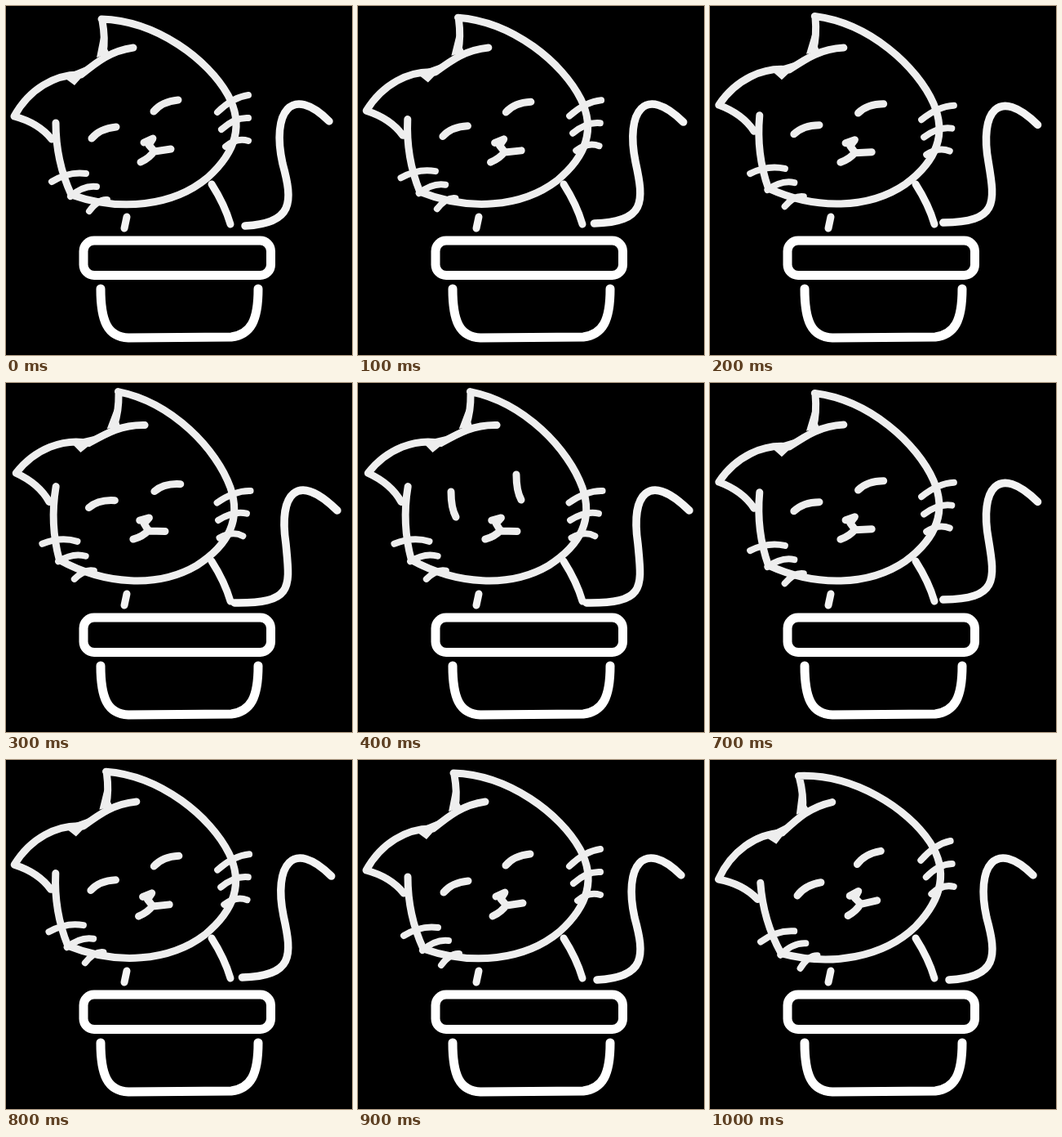
Write an HTML page with a canvas that moves like this. It is 424 px wide and 427 px high and loops after 1200 ms.

```html
<!DOCTYPE html>
<html lang="en">
<head>
<meta charset="utf-8">
<title>Cat in a pot</title>
<style>
html, body { margin: 0; width: 100%; height: 100%; overflow: hidden; background: #000; }
canvas { display: block; }
</style>
</head>
<body>
<canvas width="424" height="427"></canvas>
<script>
const ctx = document.querySelector('canvas').getContext('2d');
const HEAD = '#eee', BODY = '#f4f4f4', POT = '#fff';
const STEP = 100, STEPS = 12;
const TILTS = [9.5, 5.3, 2.6, 0, -4.2]; // degrees, from upright to most tilted

const skull = 'M117 16C185 18 248 66 272 109C290 142 285 176 247 210C205 245 140 252 80 231C68 205 61 175 61 143';
const ears = 'M118 18Q122 40 119 58M156 51C128 55 112 68 92 84C60 83 28 102 10 135Q40 143 56 163';
const earRoots = 'M69 86L84 97L108 70ZM116 38L111 63L127 58Z';
const muzzle = 'M169 167L180 162L175 170L182 178L202 175M165 191Q176 186 182 177';
const neck = 'M252 218Q268 243 275 267M148 258L145 272';
const bowl = 'M116 346C116 385 124 405 150 406L276 405C300 402 309 385 309 346';

// Bezier points of the tail: start, then two cubic segments
const tailLow = [396,141, 350,95, 325,130, 339,193, 352,240, 352,266, 293,269];
const tailHigh = [406,156, 356,107, 334,136, 343,197, 348,250, 353,270, 280,269];

function line(path, width, color) {
  ctx.lineWidth = width;
  ctx.strokeStyle = color;
  ctx.stroke(new Path2D(path));
}

// Quadratic stroke given by offsets from its start
function arc(x, y, bendX, bendY, dx, dy, width) {
  line(`M${x} ${y}q${bendX} ${bendY} ${dx} ${dy}`, width, HEAD);
}

function whisker(x, y, dx, dy) {
  arc(x, y, dx / 2, dy / 2 - 8, dx, dy, 8);
}

function drawTail(lift) {
  const arch = 4 * Math.sin(Math.PI * lift);
  const p = tailLow.map((v, k) => v + (tailHigh[k] - v) * lift - (k % 2) * arch);
  line(`M${p.slice(0, 2)}C${p.slice(2)}`, 9.5, BODY);
}

function drawPot() {
  line(bowl, 11, POT);
  ctx.beginPath();
  ctx.roundRect(95, 287, 229.5, 42.5, 13);
  ctx.stroke();
}

function drawHead(tilt, open) {
  ctx.save();
  ctx.translate(160, 136);
  ctx.rotate(tilt * Math.PI / 180);
  ctx.translate(-160, -136);
  line(skull + ears, 9, HEAD);
  ctx.fillStyle = HEAD;
  ctx.fill(new Path2D(earRoots));
  line(muzzle, 9, HEAD);
  for (let i = 0; i < 3; i++) {
    whisker(297, 109 + 28 * i, 5 * i - 38, 21 - 7 * i);
    whisker(56 + 23 * i, 215 + 18 * i, 42 - 10 * i, -10 - 2 * i);
  }
  if (!open) for (const i of [0, 1]) arc(105 + 76 * i, 162 - 33 * i, 10, -12, 30, -14, 9);
  ctx.restore();
  // open eyes stay upright
  if (open) for (const i of [0, 1]) arc(114 + 80 * i, 133 - 21 * i, 0, 20, 6, 31, 9);
}

function draw() {
  const step = Math.floor(performance.now() / STEP) % STEPS;
  // the swing mirrors around its middle and rests at both ends
  const away = Math.abs(step - 4.5);
  const tilt = TILTS[Math.min(TILTS.length - 1, Math.max(0, away - 1.5))];
  ctx.fillStyle = '#000';
  ctx.fillRect(0, 0, 424, 427);
  ctx.lineCap = ctx.lineJoin = 'round';
  drawTail(Math.max(0, tilt / TILTS[0]));
  line(neck, 9, BODY);
  drawPot();
  drawHead(tilt, away < 1);
  requestAnimationFrame(draw);
}
draw();
</script>
</body>
</html>
```
